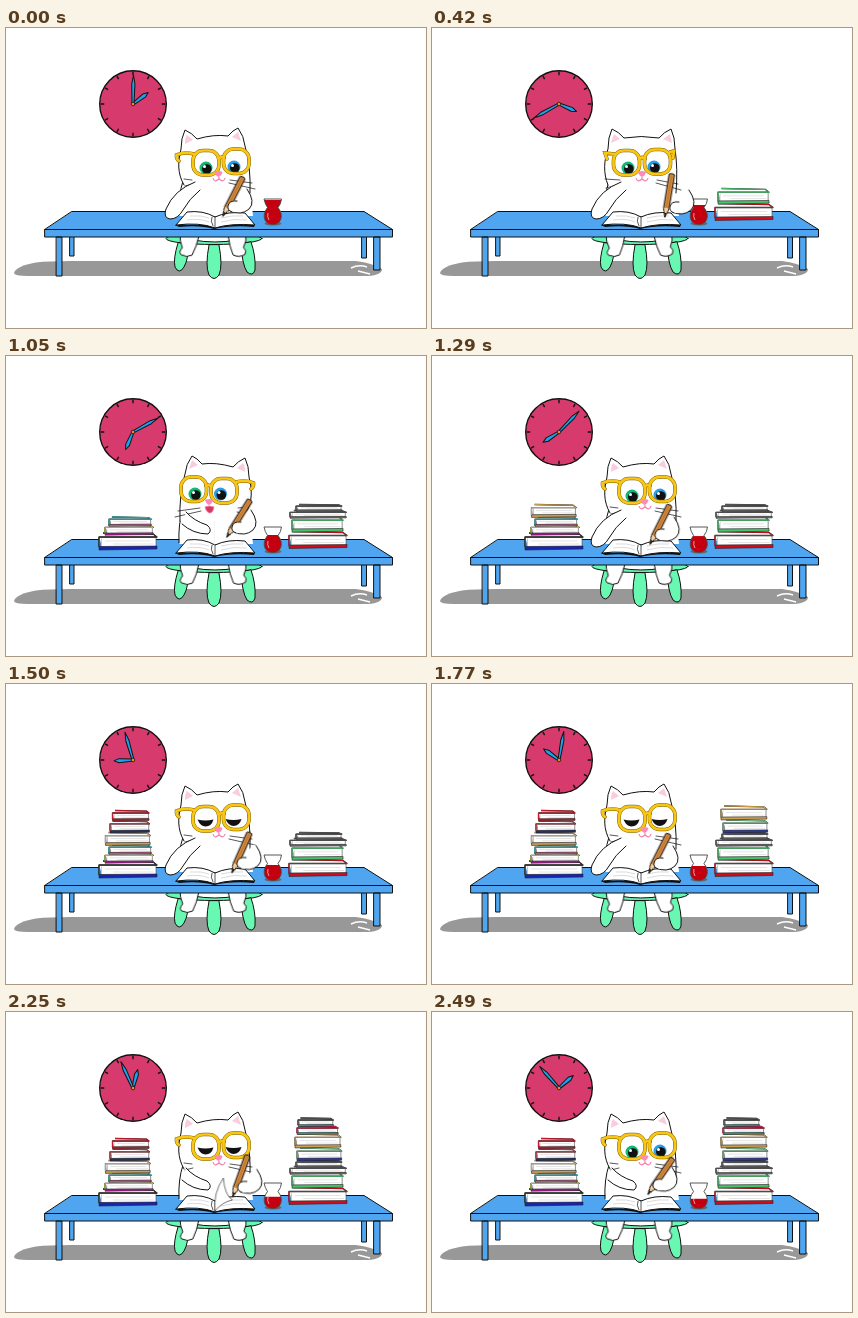
An HTML page without scripts for the animation above (2.52 s loop, 420 px wide and 300 px high).

```html
<!DOCTYPE html>
<html lang="en">
<head>
<meta charset="utf-8">
<title>Studying cat</title>
<style>
@property --step { syntax: '<integer>'; inherits: true; initial-value: 0; }
html, body { margin: 0; width: 100%; height: 100%; overflow: hidden; background: #fff; }
svg { display: block; width: 100vw; height: 100vh; animation: tick 2520ms steps(84) infinite; }
@keyframes tick { from { --step: 0; } to { --step: 84; } }

.ink { stroke: #111; stroke-width: 1; stroke-linejoin: round; stroke-linecap: round; }
.thin { stroke-width: .7; }
.white { fill: #fff; }
.line { fill: none; }
.blue { fill: #4fa5f0; }
.green { fill: #69f8b1; }

/* clock */
.hand { fill: #1ba3ea; transform-origin: 127px 76px; }
.hour { transform: rotate(calc(53deg + var(--step) * 4.2857deg)); }
.minute { transform: rotate(calc(1deg + var(--step) * 42.857deg)); }

/* books pop in one by one, --n is the order */
.books use { opacity: calc((var(--step) - 4.9 * var(--n)) * 10); }

/* poses */
.pose { animation: 2520ms step-end infinite; }
.right { animation-name: look-right; }
.front { animation-name: look-front; }
.left { animation-name: look-left; }
.lids { animation-name: sleepy; }
.rest { animation-name: rest; }
.reach { animation-name: reach; }
.rest, .reach { animation-duration: 1260ms; }
@keyframes look-right { 0%, 51.2% { opacity: 1; } 14.3% { opacity: 0; } }
@keyframes look-front { 0%, 20.24%, 51.2% { opacity: 0; } 14.3%, 46.43% { opacity: 1; } }
@keyframes look-left { 0%, 46.43% { opacity: 0; } 20.24% { opacity: 1; } }
@keyframes sleepy { 0%, 90.5% { opacity: 0; } 54.76% { opacity: 1; } }
@keyframes rest { 0% { opacity: 1; } 73.8% { opacity: 0; } }
@keyframes reach { 0% { opacity: 0; } 73.8% { opacity: 1; } }

/* two written lines, then the page is turned */
.paw { animation: write 1260ms linear infinite; }
.pencil { animation: tilt 1260ms linear infinite; }
@keyframes write {
  0%, 100% { transform: translate(217px, 188px); }
  35.7% { transform: translate(234px, 189px); }
  40.5% { transform: translate(217px, 189px); }
  73.8% { transform: translate(233px, 188px); }
  83.3% { transform: translate(221px, 181px); }
  97.6% { transform: translate(216px, 182px); }
}
@keyframes tilt {
  0%, 40.5%, 100% { transform: rotate(27deg); }
  19% { transform: rotate(24deg); }
  35.7%, 73.8% { transform: rotate(7deg); }
  83.3% { transform: rotate(32deg); }
  97.6% { transform: rotate(35deg); }
}
.page { transform-origin: 209px 198px; animation: turn 1260ms linear infinite; }
@keyframes turn {
  0%, 76% { transform: scaleX(1); opacity: 0; }
  76.1% { transform: scaleX(1); opacity: 1; }
  90.4% { transform: scaleX(-1); opacity: 1; }
  90.5%, 100% { transform: scaleX(-1); opacity: 0; }
}
.tea { fill: #c40010; animation: drink 2520ms linear infinite; }
@keyframes drink {
  0% { transform: translateY(172px); }
  16.67%, 25% { transform: translateY(177px); }
  41.67% { transform: translateY(179px); }
  59.52% { transform: translateY(181px); }
  80.95% { transform: translateY(183px); }
  100% { transform: translateY(187px); }
}
.leg { animation: swing 630ms ease-in-out infinite alternate; }
@keyframes swing { from { transform: rotate(3deg); } to { transform: rotate(-3deg); } }
</style>
</head>
<body>
<svg viewBox="0 0 420 300">
  <defs>
    <g id="book" stroke-linejoin="round">
      <path d="M2 4H57V14H2Z" fill="#fff" stroke="#444" stroke-width=".6" vector-effect="non-scaling-stroke"/>
      <path d="M6 8H52M14 11H55" stroke="#d2d2d2" stroke-width=".6" vector-effect="non-scaling-stroke"/>
      <path d="M0 13.500L58 13V16L0 17Z" fill="currentColor" stroke="#222" stroke-width=".6" vector-effect="non-scaling-stroke"/>
      <path d="M4 0L54 1L58 4H0V14" fill="#fff" stroke="#222" stroke-width="1.300" vector-effect="non-scaling-stroke"/>
      <path d="M4 0L54 1L58 4H0V14" fill="none" stroke="var(--top, currentColor)" vector-effect="non-scaling-stroke"/>
    </g>
    <g id="eye">
      <circle cy="5" r="6.500" fill="currentColor"/>
      <circle cx=".8" cy="6" r="4.800" fill="#111"/>
      <circle cx="-1.500" cy="3.500" r="1.500" fill="#fff"/>
    </g>
    <g id="lid">
      <path d="M-9 13V-5Q0 -13 9 -5V13Z" fill="#fff"/>
      <path d="M-8 1Q0 3 8 1Q6 8 0 8Q-5 8 -8 1Z" fill="#111"/>
    </g>
    <g id="side-frame" fill="none" stroke-linecap="round">
      <rect x="187" y="122.500" width="26" height="24.500" rx="10"/>
      <rect x="217.500" y="121" width="25.500" height="24.500" rx="10"/>
      <path d="M213 131Q215 128 218 130M188 126Q178 123.500 170.500 127Q170 131 173 133"/>
    </g>
    <g id="front-frame" fill="none" stroke-linecap="round">
      <rect x="181.500" y="122.500" width="26" height="24.500" rx="10"/>
      <rect x="212.500" y="121.500" width="26" height="24.500" rx="10"/>
      <path d="M207 131Q210 128 213 131M183 126L173 125L175 131M238 124L242 123L241 130"/>
    </g>
    <g id="side-specs">
      <use href="#side-frame" stroke="#7a5c00" stroke-width="3.600"/>
      <use href="#side-frame" stroke="#f8c613" stroke-width="2.700"/>
    </g>
    <g id="side-head">
      <path class="ink white" d="M178 157C171 145 172 133 175 121Q175 110 179 102Q186 105 191 111Q208 106 222 108Q227 102 232 100Q238 108 239 118Q245 138 244 165"/>
      <path d="M179 116Q179 110 181 107L187 112ZM226 109L232 104L235 113Z" fill="#f9cce0"/>
      <path class="ink line thin" d="M224 152L246 155M223 155L249 161M186 152L178 151M187 156L179 158"/>
    </g>
    <path id="nose" d="M-4 -2Q0 -4 4 -2Q3 2 0 3Q-3 2 -4 -2Z" fill="#ff8ab7"/>
    <path id="smile" d="M-6 3Q-5 8 0 4Q5 8 6 3M0 2V4" fill="none" stroke="#f37fae" stroke-width="1.200"/>
    <path id="glass" d="M258 171H275.500Q275 176 272 179.500Q277 186 274.500 192Q272 196.500 267 196.500Q261 196.500 259 192Q256.500 186 261.500 179.500Q259 176 258 171Z"/>
    <clipPath id="glass-clip"><use href="#glass"/></clipPath>
  </defs>

  <!-- floor -->
  <path d="M8 245Q10 238 30 234.500Q42 233 64 233H350Q366 235 376 241Q376 247 362 248H22Q8 248 8 245Z" fill="#989898"/>
  <path d="M345 240Q353 236 361 239M352 243L364 246" fill="none" stroke="#fff" stroke-width="1.400"/>

  <!-- clock -->
  <circle cx="127" cy="76" r="33.300" fill="#d73a6d" stroke="#111" stroke-width="1.400"/>
  <circle cx="127" cy="76" r="30.500" fill="none" stroke="#111" stroke-width="3.500" pathLength="120" stroke-dasharray=".9 9.100" stroke-dashoffset=".45"/>
  <path class="ink hand hour" d="M126 76L125 62L127 57L129 62L128 76Z"/>
  <path class="ink hand minute" d="M126 76L125.400 56L127 47L128.600 56L128 76Z"/>
  <circle cx="127" cy="76" r="1.800" fill="#f08a24" stroke="#111" stroke-width=".7"/>

  <!-- stool and legs -->
  <path class="ink blue" d="M64 208H68V228H64ZM356 208H360.500V230H356Z"/>
  <g class="ink green">
    <ellipse cx="208" cy="210.500" rx="48" ry="6"/>
    <path d="M172 215Q167 231 169 239Q173 247 178 239Q183 230 182 216Z"/>
    <path d="M203 217Q199 238 203 247Q208 254 213 247Q217 238 213 217Z"/>
    <path d="M235 216Q236 236 241 244Q247 249 249 242Q250 228 245 214Z"/>
  </g>
  <path class="ink white" d="M187 207H231V212Q209 216 187 212Z"/>
  <path class="ink white leg" style="transform-origin:183px 208px" d="M174 207Q174 214 177 220Q173 225 176 227Q182 230 187 227Q191 219 193 207Z"/>
  <path class="ink white leg" style="transform-origin:231px 208px" d="M222 207Q224 219 228 227Q234 230 240 226Q242 222 238 219Q241 213 240 207Z"/>

  <!-- table -->
  <path class="ink blue" d="M66 183.500H358L386.500 201.500H39Z"/>
  <path class="ink blue" d="M39 201.500H386.500V209H39ZM50.500 209H56V248H50.500ZM368 209H374V242H368Z"/>

  <!-- cat -->
  <path class="white" d="M176 150H243L247 188H173Z"/>
  <path class="ink line" d="M177 153Q172 168 173 187"/>
  <g class="pose right">
    <use href="#side-head"/>
    <use href="#eye" x="200" y="135" color="#12b878"/>
    <use href="#eye" x="228" y="134" color="#2c9be8"/>
    <g class="pose lids"><use href="#lid" x="199.500" y="134.500"/><use href="#lid" x="227.500" y="134"/></g>
    <use href="#side-specs"/>
    <use href="#nose" x="212.500" y="146"/><use href="#smile" x="213" y="147"/>
  </g>
  <g class="pose front">
    <path class="ink white" d="M176 157C171 145 172 132 176 121Q176 109 180 101Q187 104 192 110Q209 107 227 110Q232 104 239 101Q243 109 243 121Q246 140 244 165"/>
    <path d="M179 115L182 106L188 111ZM231 111L238 106L240 115Z" fill="#f9cce0"/>
    <path class="ink line thin" d="M225 152L246 156M224 155L249 162M188 152L173 151M189 156L174 160"/>
    <use href="#eye" x="196" y="135" color="#12b878"/>
    <use href="#eye" x="222" y="134" color="#2c9be8"/>
    <use href="#front-frame" stroke="#7a5c00" stroke-width="3.600"/>
    <use href="#front-frame" stroke="#f8c613" stroke-width="2.700"/>
    <use href="#nose" x="210" y="146"/><use href="#smile" x="210" y="147"/>
  </g>
  <g class="pose left">
    <g transform="translate(418) scale(-1 1)"><use href="#side-head"/></g>
    <use href="#eye" x="189" y="133" color="#12b878"/>
    <use href="#eye" x="214.500" y="133" color="#2c9be8"/>
    <g transform="translate(418) scale(-1 1)"><use href="#side-specs"/></g>
    <use href="#nose" x="203" y="146"/>
    <path d="M199 151Q203 149 208 151Q207 157 203.500 157Q200 156 199 151Z" fill="#d5375f" stroke="#f37fae"/>
  </g>
  <path class="ink white pose rest" d="M189 154Q168 162 160 181Q157 190 164 191Q172 191 177 182Q183 171 194 162"/>
  <path class="ink white pose reach" d="M180 156Q188 165 201 169Q207 174 202 178Q187 178 176 168"/>

  <!-- open book -->
  <path d="M169.500 197L173 199Q194 197 208 201Q225 197 248 199L249 196L209 197Z" fill="#111"/>
  <path class="ink white" d="M170 197L181 184Q197 182 209 189Q222 183 239 185L249 197Q225 195 209 200Q194 194 170 197Z"/>
  <path class="ink line thin" d="M209 189V200M206 189Q204 193 207 198"/>
  <path d="M184 188Q195 187 203 190M181 192Q194 190 203 194M215 190Q226 187 237 188M215 194Q228 190 241 192" fill="none" stroke="#ccc" stroke-width=".7"/>
  <path class="ink white thin page" d="M209 199Q206 181 222 166Q224 183 236 188Q220 190 209 199Z"/>

  <!-- tea -->
  <ellipse cx="267" cy="195.500" rx="8.500" ry="2" fill="#666"/>
  <use href="#glass" fill="#fff"/>
  <g clip-path="url(#glass-clip)"><rect class="tea" x="256" width="22" height="30"/></g>
  <use href="#glass" fill="none" stroke="#444" stroke-width=".9"/>
  <path d="M262 185Q261 189 263 192" fill="none" stroke="#fff" opacity=".6"/>

  <!-- books -->
  <g class="books">
    <use href="#book" transform="translate(283 175.500)" style="--n:1;color:#d20b1d"/>
    <use href="#book" transform="translate(286 160.500) scale(.88 .92)" style="--n:2;color:#46c46c"/>
    <use href="#book" transform="translate(93 177)" style="--n:3;color:#1824b5;--top:#333"/>
    <use href="#book" transform="translate(99 169) scale(.83 .6)" style="--n:4;color:#b516a0;--top:#b4c63a"/>
    <use href="#book" transform="translate(103 161) scale(.73 .55)" style="--n:5;color:#f04fa0;--top:#1cb8b8"/>
    <use href="#book" transform="translate(284 154.500) scale(.97 .46)" style="--n:6;color:#777;--top:#555"/>
    <use href="#book" transform="translate(290 148.500) scale(.79 .4)" style="--n:7;color:#777;--top:#555"/>
    <use href="#book" transform="translate(99.500 148.500) scale(.77 .76)" style="--n:8;color:#cfa052"/>
    <use href="#book" transform="translate(104 137) scale(.68 .7)" style="--n:9;color:#263069;--top:#c43a48"/>
    <use href="#book" transform="translate(106.500 126.500) scale(.63 .62)" style="--n:10;color:#c71a2b"/>
    <use href="#book" transform="translate(291 136) scale(.77 .76)" style="--n:11;color:#2b3ba0;--top:#79b98c"/>
    <use href="#book" transform="translate(289 122) scale(.79 .82)" style="--n:12;color:#cfa052"/>
    <use href="#book" transform="translate(291 114) scale(.71 .5)" style="--n:13;color:#18b5ae;--top:#d51c4c"/>
    <use href="#book" transform="translate(292 106) scale(.61 .5)" style="--n:14;color:#18b5ae;--top:#555"/>
  </g>

  <!-- paw and pencil -->
  <g class="paw">
    <path class="white" d="M22 -28Q34 -14 26 -7Q18 0 7 -5Q3 -9 8 -15Z"/>
    <path class="ink line" d="M24 -27Q33 -14 26 -7Q18 0 7 -5"/>
    <g class="pencil">
      <path class="ink" d="M-2.800 -9V-43Q0 -45 2.800 -43V-9L0 0Z" fill="#d68a3c"/>
      <path d="M-2.300 -9L0 -1L2.300 -9Z" fill="#f3d3a4"/>
      <path d="M-1.200 -4L0 0L1.200 -4Z" fill="#111"/>
      <path d="M0 -10V-42" stroke="#a5652a" stroke-width=".7"/>
    </g>
    <path class="white" d="M5 -11Q8 -17 16 -15Q19 -8 12 -4Q3 -4 5 -11Z"/>
    <path class="ink line" d="M14 -15Q6 -16 5 -10Q4 -6 9 -4"/>
  </g>
</svg>
</body>
</html>
```
